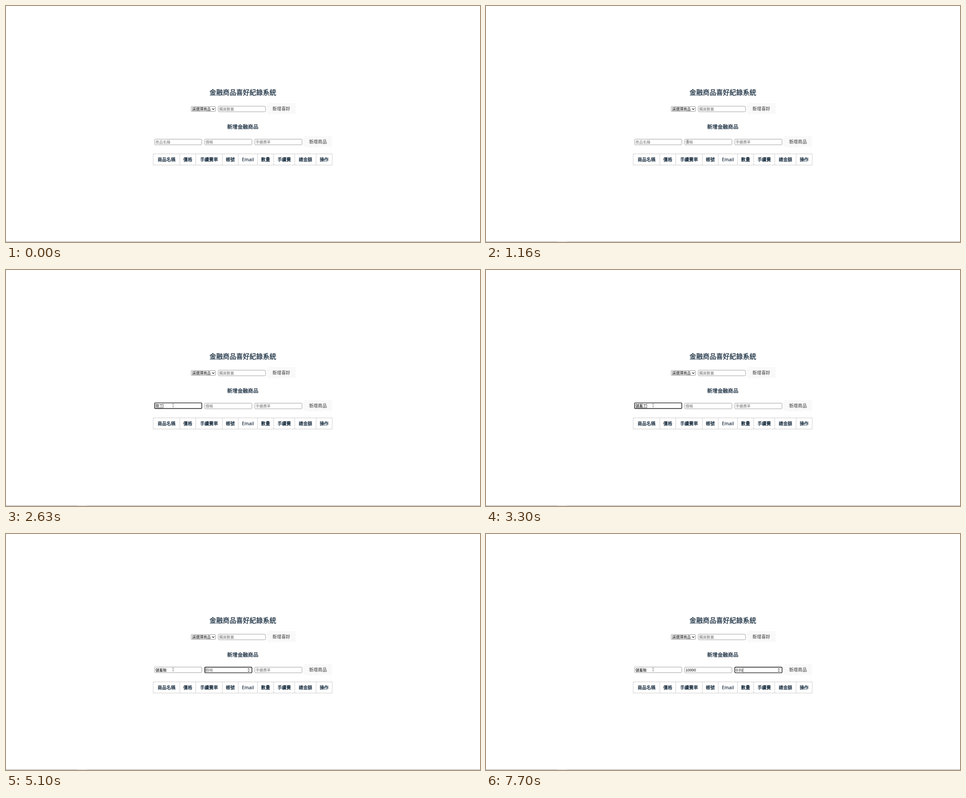
Animation of 1058 by 529 pixels, one loop 8 s. Source, as an HTML page:

```html
<!DOCTYPE html>
<html lang="zh-Hant">
<head>
<meta charset="utf-8">
<title>金融商品喜好紀錄系統</title>
<style>
  html, body { margin: 0; width: 100%; height: 100%; overflow: hidden; background: #fff; }
  svg { display: block; width: 1058px; height: 529px; }
  text { font-family: 'Noto Sans CJK TC', 'Noto Sans CJK', sans-serif; fill: #213547; white-space: pre; }
  .mid { text-anchor: middle; }
  .bold { stroke: #213547; stroke-width: .38px; }
  .field { font-family: 'Liberation Sans', 'Noto Sans CJK TC', 'Noto Sans CJK', sans-serif; font-size: 8.3px; fill: #000; }
  .hint { fill: #757575; }
  .latin { font-family: 'Open Sans', sans-serif; font-weight: 600; }
</style>
</head>
<body>
<svg id="stage" viewBox="0 0 1058 529"></svg>
<script>
const LOOP = 8000;
const TICK = 67.5;
const stage = document.getElementById('stage');

function add(tag, attrs, parent = stage, content = '') {
  const node = document.createElementNS('http://www.w3.org/2000/svg', tag);
  for (const name in attrs) node.setAttribute(name, attrs[name]);
  node.textContent = content;
  parent.appendChild(node);
  return node;
}

const show = (node, on) => node.setAttribute('visibility', on ? 'visible' : 'hidden');

function label(content, x, y, size, cls = 'mid') {
  return add('text', { x, y, 'font-size': size, class: cls }, stage, content);
}

function button(content, x, y, w) {
  add('rect', { x, y, width: w, height: 25, rx: 5, fill: '#f9f9f9' });
  label(content, x + w / 2, y + 16.2, 9.92).style.fill = '#333';
}

// A text box whose value, focus ring, caret and spinner can be set.
function input(hint, x, y, spinner) {
  const g = add('g', {});
  const box = add('rect', { x: x + .5, y: y + .5, width: 105.4, height: 12.6, rx: 1.6, fill: '#fff' }, g);
  const left = x + 2.5;
  const text = add('text', { x: left, y: y + 10.1, class: 'field' }, g);
  const line = add('rect', { x: left, y: y + 11.2, height: .6, fill: '#222' }, g);
  const caret = add('rect', { y: y + 2.2, width: .7, height: 9.4, fill: '#000' }, g);
  const arrows = add('path', {
    d: `M${x + 96} ${y + 5.6}l2.6 -2.8l2.6 2.8zM${x + 96} ${y + 8.4}l2.6 2.8l2.6 -2.8z`,
    fill: '#606060'
  }, g);
  let last = null;

  function set({ value = '', focus = false, blink = true, composing = false, lift = 0 }) {
    const key = [value, focus, blink, composing, lift].join();
    if (key === last) return;
    last = key;
    text.textContent = value || hint;
    text.setAttribute('class', value ? 'field' : 'field hint');
    box.setAttribute('stroke', focus ? '#101010' : '#858585');
    box.setAttribute('stroke-width', focus ? 1.4 : .8);
    const width = value ? text.getComputedTextLength() : 0;
    caret.setAttribute('x', left + width);
    line.setAttribute('width', width);
    show(caret, focus && blink);
    show(line, composing);
    show(arrows, focus && spinner);
    g.setAttribute('transform', `translate(0 ${-lift})`);
  }
  set({});
  return set;
}

// Static page
label('金融商品喜好紀錄系統', 528.7, 199.2, 14.88, 'mid bold');
label('新增金融商品', 528.5, 275.3, 11.62, 'mid bold');

add('rect', { x: 413.4, y: 225.5, width: 54.2, height: 10.8, rx: 1.5, fill: '#fff', stroke: '#767676', 'stroke-width': .8 });
add('text', { x: 415.6, y: 234.1, class: 'field' }, stage, '請選擇商品');
add('path', { d: 'M460 229.6l2.6 2.6l2.6 -2.6', fill: 'none', stroke: '#111', 'stroke-width': 1.2 });
input('購買數量', 473.4, 224, false);
button('新增喜好', 582.3, 217.5, 64.7);

const nameBox = input('商品名稱', 331.1, 298, false);
const priceBox = input('價格', 443, 298, true);
const rateBox = input('手續費率', 554.9, 298, true);
button('新增商品', 664, 291.5, 64.5);

const edges = [328.5, 388, 423.5, 483, 518.5, 561.5, 597.5, 644.5, 692.2, 728];
const heads = ['商品名稱', '價格', '手續費率', '帳號', 'Email', '數量', '手續費', '總金額', '操作'];
add('path', {
  d: 'M328 331.5H728.5M328 356.5H728.5' + edges.map(x => `M${x} 331.5V356.5`).join(''),
  fill: 'none', stroke: '#c8c8c8', 'stroke-width': .9
});
heads.forEach((head, i) => {
  const latin = head === 'Email';
  label(head, (edges[i] + edges[i + 1]) / 2, 347.9, latin ? 10.2 : 9.92, latin ? 'mid latin' : 'mid bold');
});

add('rect', { x: 0, y: 528, width: 1058, height: 1, fill: '#999' });
const gap = add('rect', { y: 528, width: 20, height: 1, fill: '#bdbdbd' });

const arrow = add('path', {
  d: 'M0 0V7L1.6 5.6L2.7 8L3.8 7.5L2.8 5.2H4.9Z',
  fill: '#fff', stroke: '#444', 'stroke-width': .7
});
const beam = add('path', {
  d: 'M-1.7 -3.5H-.5L0 -3L.5 -3.5H1.7M0 -3V3M-1.7 3.5H-.5L0 3L.5 3.5H1.7',
  fill: 'none', stroke: '#666', 'stroke-width': .8
});

// Motion: [time, x, y] for the pointer, [time, value] for typing
const path = [
  [70, 969, 505], [210, 850, 420], [410, 600, 345], [610, 461, 318],
  [720, 590, 278], [815, 714, 281], [950, 640, 296], [1150, 450, 304], [1360, 376, 304], [1440, 373, 303.5]
];
const nameSteps = [
  [2160, 'ㄔ'], [2260, 'ㄔㄨ'], [2360, '除'], [2630, '除ㄒ'], [2830, '除ㄒㄩ'], [3030, '儲蓄'],
  [3300, '儲蓄ㄒ'], [3400, '儲蓄ㄒㄧ'], [3490, '儲蓄ㄒㄧㄢ'], [3960, '儲蓄險']
];
const priceSteps = [[5430, '1'], [5630, '10'], [5830, '100'], [5960, '1000'], [6160, '10000']];
const rateSteps = [[7030, '0'], [7230, '0.'], [7430, '0.0'], [7700, '0.01']];

const within = (t, from, to) => t >= from && t < to;
const typed = (steps, t) => steps.reduce((value, [at, next]) => t >= at ? next : value, '');

function pointAt(t) {
  const time = Math.min(70 + Math.floor((t - 70) / TICK + .001) * TICK, 1440);
  const i = Math.max(1, path.findIndex(p => p[0] >= time));
  const [t0, x0, y0] = path[i - 1];
  const [t1, x1, y1] = path[i];
  const k = (time - t0) / (t1 - t0);
  return [x0 + (x1 - x0) * k, y0 + (y1 - y0) * k];
}

function movePointer(t) {
  const [x, y] = t >= 1440 ? [373, 303.5] : pointAt(Math.max(t, 70));
  const overInput = y > 298 && y < 311 && [331, 443, 555].some(left => x > left && x < left + 106);
  show(arrow, t >= 70 && !overInput);
  show(beam, t >= 70 && overInput);
  for (const shape of [arrow, beam]) shape.setAttribute('transform', `translate(${x} ${y})`);
}

function draw(t) {
  const name = typed(nameSteps, t);
  nameBox({
    value: name,
    focus: within(t, 1360, 5100),
    blink: !within(t, 1890, 2160) && t < 4830,
    composing: within(t, 2160, 4290),
    lift: !name ? 0 : /[ㄅ-ㄩ]/.test(name) ? .6 : .3
  });
  priceBox({ value: typed(priceSteps, t), focus: within(t, 5100, 6500) });
  rateBox({ value: typed(rateSteps, t), focus: t >= 6500 });
  show(gap, t >= 340);
  gap.setAttribute('x', t < 1080 ? 59 : 160);
  movePointer(t);
}

const start = performance.now();
function frame() {
  draw((performance.now() - start) % LOOP);
  requestAnimationFrame(frame);
}
frame();
</script>
</body>
</html>
```
